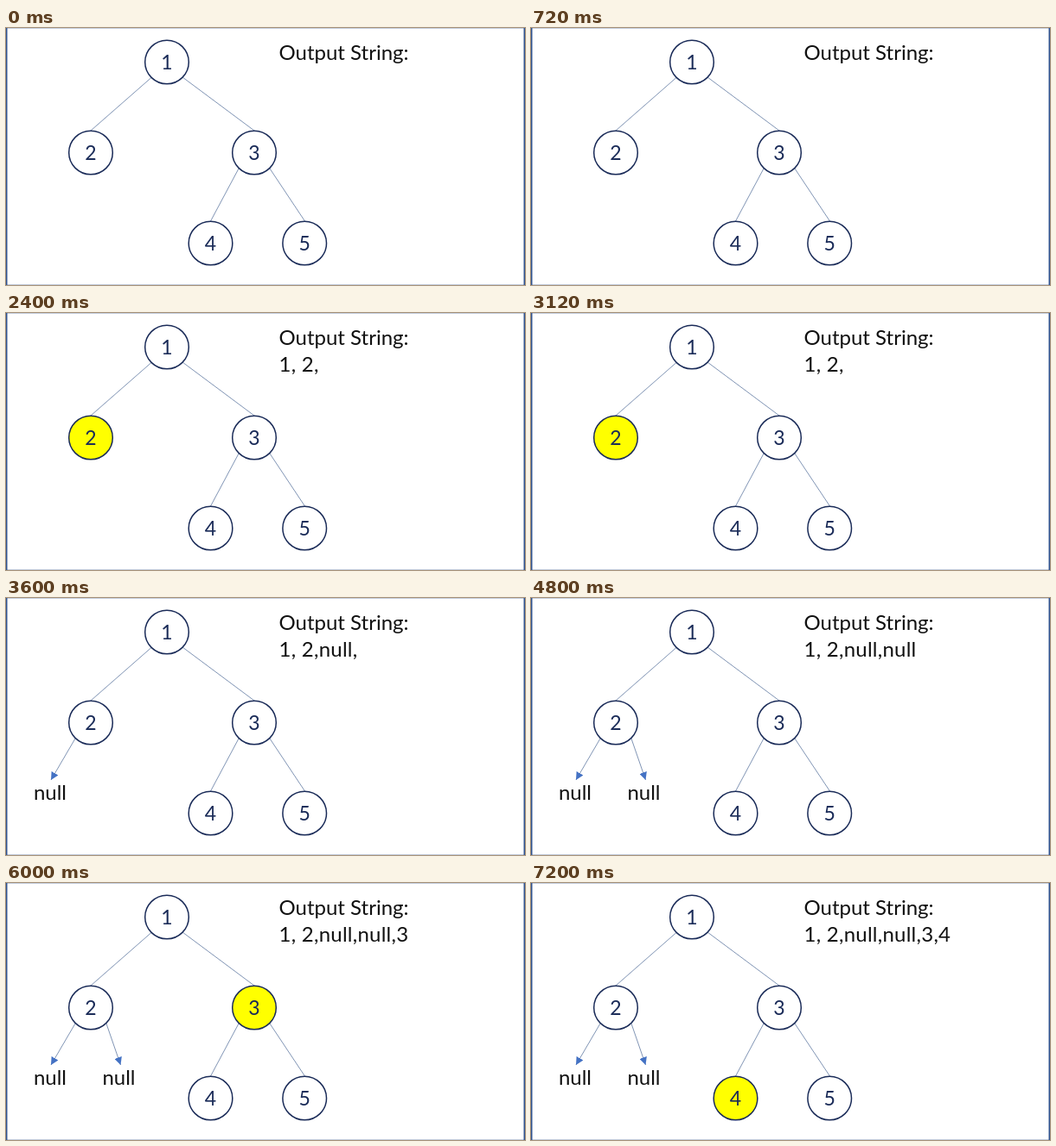
An HTML page that plays this animation: 600x298 px, repeating every 8 s.

```html
<!DOCTYPE html>
<html lang="en">
<head>
<meta charset="utf-8">
<title>Preorder tree traversal</title>
<style>
  html, body { margin: 0; width: 100%; height: 100%; overflow: hidden; background: #fff; }
  svg { display: block; width: 600px; height: 298px; }
  text { font: 24px Lato, sans-serif; fill: #111; }
  .node circle { fill: #fff; stroke: #1a2b58; stroke-width: 1.5; }
  .node.active circle { fill: #ff0; }
  .node text { font-size: 23px; fill: #1a2b58; }
  .label { text-anchor: middle; }
  .edge { fill: none; stroke: #7288ac; stroke-width: .9; }
  .side { stroke: #2f528f; stroke-width: 1.5; }
  .rim { stroke: #c5cede; }
  #output { letter-spacing: .25px; }
</style>
</head>
<body>
<svg viewBox="0 0 600 298">
  <defs>
    <marker id="head" markerUnits="userSpaceOnUse" markerWidth="9" markerHeight="9" refX="9" refY="4.5" orient="auto">
      <path d="M0 0 9 4.5 0 9z" fill="#4472c4"/>
    </marker>
  </defs>
  <path class="rim" d="M0 .5H600M0 297.5H600"/>
  <path class="side" d="M.75 0V298M599.25 0V298"/>
  <path class="edge" d="M168 57.5 98 119M204 57 287 119M269 163 236.5 224M305 163 345.5 224"/>
  <g id="nodes"></g>
  <g id="nulls"></g>
  <text x="315.5" y="36.5">Output String:</text>
  <text id="output" x="315.5" y="68"></text>
</svg>
<script>
const STEP = 1200, LOOP = 8000;
const nodes = [[186, 39.5], [98, 144.5], [287, 144.5], [236.5, 249.5], [345.2, 249.5]];
const leaves = [{ x: 51, from: 80, to: 52 }, { x: 130.5, from: 116, to: 132.5 }];
// Each step: text so far, highlighted node, visible null leaves
const steps = [
  ['', 0, 0],
  ['1,', 1, 0],
  ['1, 2,', 2, 0],
  ['1, 2,null,', 0, 1],
  ['1, 2,null,null', 0, 2],
  ['1, 2,null,null,3', 3, 2],
  ['1, 2,null,null,3,4', 4, 2]
];
const byId = id => document.getElementById(id);
const nodeGroup = byId('nodes'), nullGroup = byId('nulls'), output = byId('output');

nodeGroup.innerHTML = nodes.map(([x, y], i) => `<g class="node">
  <circle cx="${x}" cy="${y}" r="25.3"/>
  <text class="label" x="${x}" y="${y + 8.7}">${i + 1}</text></g>`).join('');
nullGroup.innerHTML = leaves.map(({ x, from, to }) => `<g>
  <path class="edge" d="M${from} 163 ${to} 211" marker-end="url(#head)"/>
  <text class="label" x="${x}" y="234">null</text></g>`).join('');

let shown = -1;
function draw() {
  const step = Math.floor(performance.now() % LOOP / STEP);
  if (step !== shown) {
    shown = step;
    const [text, active, nullCount] = steps[step];
    output.textContent = text;
    [...nodeGroup.children].forEach((g, i) => g.classList.toggle('active', i + 1 === active));
    [...nullGroup.children].forEach((g, i) => g.setAttribute('visibility', i < nullCount ? 'visible' : 'hidden'));
  }
  requestAnimationFrame(draw);
}
draw();
</script>
</body>
</html>
```
